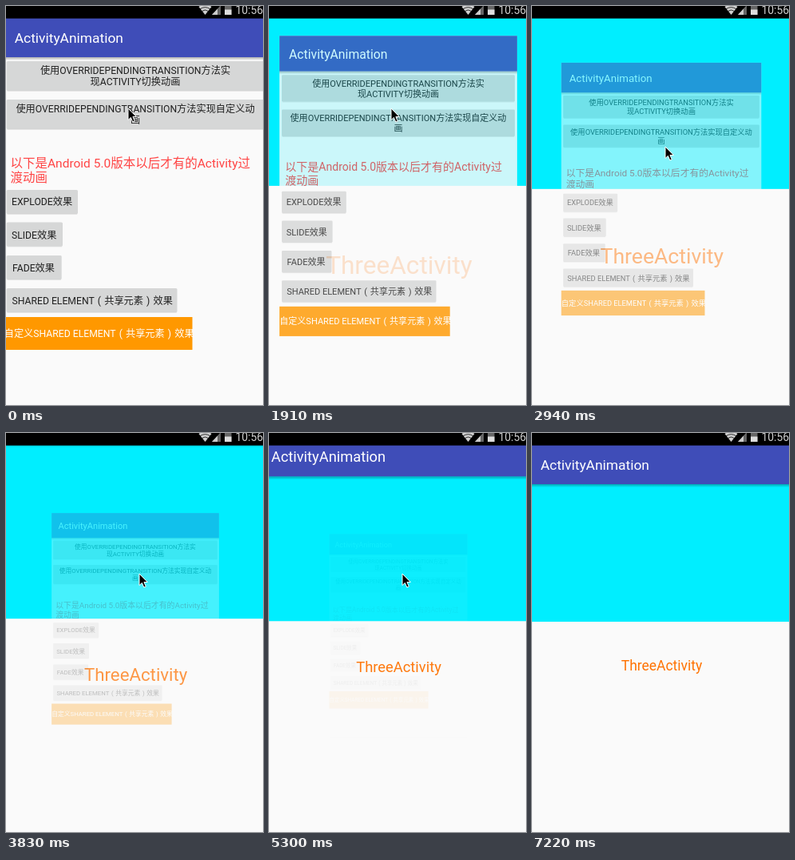
Write an HTML page that moves like this. It is 322x499 px and loops after 7370 ms.

```html
<!DOCTYPE html>
<html lang="zh-CN">
<head>
<meta charset="utf-8">
<title>ActivityAnimation</title>
<style>
  html, body { margin: 0; width: 100%; height: 100%; overflow: hidden; background: #fafafa; }
  svg { display: block; width: 322px; height: 499px; font: 12.2px Roboto, "Noto Sans CJK SC", "Noto Sans CJK", sans-serif; }
  .title { font-size: 17.4px; fill: #fff; }
  .three { font-size: 17.45px; fill: #ff7200; }
  .note { font-size: 15.5px; fill: #ff4444; }
  .btn { fill: #d6d7d7; }
  .mid { text-anchor: middle; }
  .label { fill: #212121; }
</style>
</head>
<body>
<svg viewBox="0 0 322 499">
  <defs>
    <linearGradient id="shade" x2="0" y2="1">
      <stop stop-opacity=".3"/>
      <stop offset="1" stop-opacity="0"/>
    </linearGradient>
    <g id="bar">
      <rect x="-2.5" y="64" width="329" height="4" fill="url(#shade)"/>
      <rect x="-2.5" y="15" width="329" height="49" fill="#3f4db8"/>
      <text class="title" x="10.7" y="46.3">ActivityAnimation</text>
    </g>
  </defs>

  <g id="next">
    <rect x="-2.5" y="15" width="329" height="500" fill="#fafafa"/>
    <rect x="-2.5" y="15" width="329" height="221" fill="#00eeff"/>
    <use href="#bar"/>
    <text class="three mid" x="162.5" y="297">ThreeActivity</text>
  </g>

  <g id="prev">
    <rect x="-2.5" y="15" width="329" height="484" fill="#fafafa"/>
    <use href="#bar"/>
    <g id="buttons"></g>
    <text class="note" x="5.5" y="201.5">以下是Android 5.0版本以后才有的Activity过</text>
    <text class="note" x="5.5" y="219.7">渡动画</text>
    <rect x="-2.5" y="389" width="236" height="41" fill="#ff9800"/>
    <text x="-2.3" y="414" fill="#fff">自定义SHARED ELEMENT&#x2004;(&#x2004;共享元素&#x2004;)&#x2004;效果</text>
  </g>

  <g id="status">
    <rect width="322" height="15.6"/>
    <path d="M249.5 11L241.5 1Q249.5-5 257.5 1Z" fill="#d0d0d0"/>
    <path d="M243 3.8Q249.5-.5 256 3.8M245.3 6.5Q249.5 3.5 253.7 6.5" fill="none" stroke="#000" stroke-width=".8"/>
    <path d="M258 11L269-1V11Z" fill="#666"/>
    <path d="M258 11L265 3.4V11Z" fill="#ccc"/>
    <rect x="274" y="-1" width="8.5" height="12" fill="#666"/>
    <rect x="274" y="4.5" width="8.5" height="6.5" fill="#ddd"/>
    <text x="287.5" y="10.3" font-size="13.9" fill="#d0d0d0">10:56</text>
  </g>

  <path id="cursor" d="M0 0V14.5L3.4 11.4L5.8 17L8.3 16L5.9 10.5H10.3Z" stroke="#fff"/>
</svg>
<script>
  const LOOP = 7370, START = 1620, TICK = 147.3, CX = 162, CY = 249.7;
  const $ = id => document.getElementById(id);

  // Button: x, y, width, height, then lines of [x, baseline, text, class]
  const button = (id, y, w, h, ...lines) =>
    `<rect id="${id}" class="btn" x=".7" y="${y}" width="${w}" height="${h}" rx="1.5"/>` +
    `<path d="M1.5 ${y + h + .4}h${w - 1.6}" stroke="#000" stroke-opacity=".12" stroke-width=".8"/>` +
    lines.map(([x, base, text, cls = '']) =>
      `<text class="label ${cls}" x="${x}" y="${base}">${text}</text>`).join('');

  $('buttons').innerHTML =
    button('plain', 69, 322.6, 37,
      [162, 85, '使用OVERRIDEPENDINGTRANSITION方法实', 'mid'],
      [162, 99.3, '现ACTIVITY切换动画', 'mid']) +
    button('custom', 117, 322.6, 37,
      [162, 133, '使用OVERRIDEPENDINGTRANSITION方法实现自定义动', 'mid'],
      [162, 147.3, '画', 'mid']) +
    button('explode', 230, 89.3, 30, [7, 249.3, 'EXPLODE效果']) +
    button('slide', 270.5, 70.3, 30, [7, 290.7, 'SLIDE效果']) +
    button('fade', 312, 69, 30, [8, 332, 'FADE效果']) +
    button('shared', 353, 213.8, 30, [7.5, 373, 'SHARED ELEMENT\u2004(\u2004共享元素\u2004)\u2004效果']);

  // Linear interpolation through [time, ...values] keys
  function at(keys, t) {
    if (t <= keys[0][0]) return keys[0].slice(1);
    const i = keys.findIndex(k => k[0] > t);
    if (i < 0) return keys[keys.length - 1].slice(1);
    const a = keys[i - 1], b = keys[i], f = (t - a[0]) / (b[0] - a[0]);
    return a.slice(1).map((v, n) => v + (b[n + 1] - v) * f);
  }

  const progress = [[1620, .045], [1910, .099], [2940, .275], [3830, .4756], [4560, .639], [6190, .93], [6480, 1]];
  const pointer = [[2210, 153, 128], [2650, 167, 176], [6650, 167, 176], [6797, 217, 318], [6940, 265, 415], [7090, 275, 485]];

  const zoom = s => `translate(${CX} ${CY}) scale(${s}) translate(${-CX} ${-CY})`;

  function draw(t) {
    const step = Math.floor((t - START + 10) / TICK);
    const time = START + step * TICK;
    const p = step < 0 ? 0 : at(progress, time)[0];
    const e = 1 - (1 - p) ** 2;
    $('prev').setAttribute('transform', zoom(1 - e / 2));
    $('prev').setAttribute('opacity', 1 - e);
    $('next').setAttribute('transform', zoom(2 - e));
    $('custom').style.fill = t >= 1020 && t < 1170 ? '#c9caca' : '';
    const [x, y] = at(pointer, time);
    $('cursor').setAttribute('transform', `translate(${x} ${y})`);
    $('cursor').style.display = t < 7215 ? '' : 'none';
  }

  const origin = performance.now();
  function frame() {
    draw((performance.now() - origin) % LOOP);
    requestAnimationFrame(frame);
  }
  frame();
</script>
</body>
</html>
```
